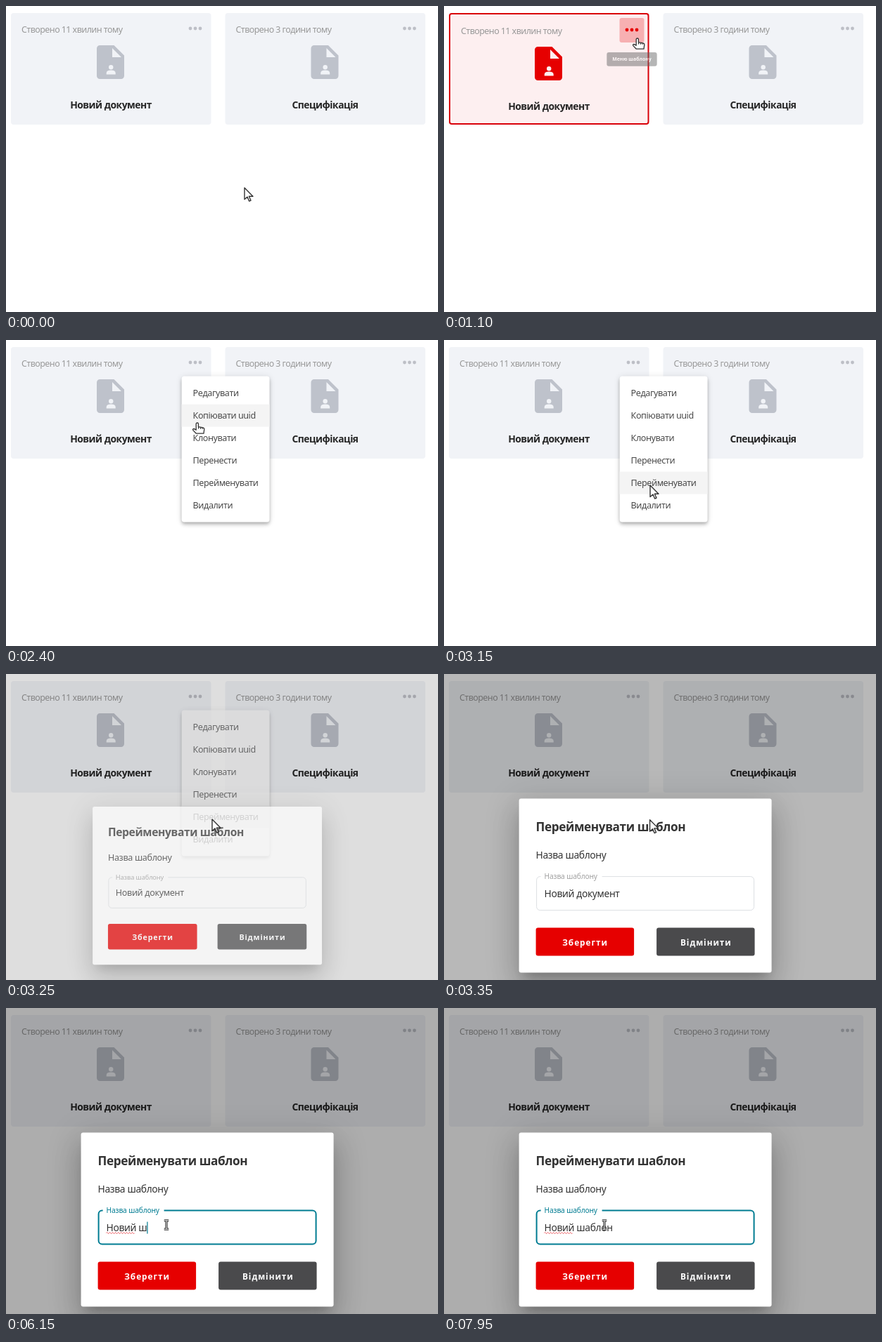
An HTML page for the animation above (8 s loop, 614 px wide and 436 px high).

```html
<!DOCTYPE html>
<html lang="uk">
<head>
<meta charset="utf-8">
<title>Перейменувати шаблон</title>
<style>
html, body { margin: 0; width: 100%; height: 100%; overflow: hidden; background: #fff; }
#stage { position: relative; width: 614px; height: 436px; overflow: hidden; font-family: "Noto Sans", "Open Sans", sans-serif; }
#stage > * { position: absolute; }
svg { display: block; overflow: visible; }
#menu { left: 250px; top: 52px; width: 125px; height: 208px; border-radius: 4px; background: #fff; transform-origin: 0 0;
  box-shadow: 0 2px 4px -1px rgba(0,0,0,.2), 0 4px 5px rgba(0,0,0,.14), 0 1px 10px rgba(0,0,0,.12); }
#shade { inset: 0; background: #000; }
#dialog { left: 107px; top: 178px; width: 359px; height: 248px; border-radius: 3px; background: #fff;
  box-shadow: 0 11px 15px -7px rgba(0,0,0,.2), 0 24px 38px 3px rgba(0,0,0,.14), 0 9px 46px 8px rgba(0,0,0,.12); }
.meta { font-size: 12.4px; letter-spacing: -.53px; fill: #999; }
.name { font-size: 13.9px; font-weight: 700; letter-spacing: -.5px; fill: #262626; text-anchor: middle; }
.item { font-size: 12.6px; letter-spacing: -.44px; fill: #4a4a4a; }
.head { font-size: 17.2px; font-weight: 700; letter-spacing: -.4px; fill: #333; }
.body { font-size: 13.8px; letter-spacing: -.36px; fill: #333; }
.small { font-size: 10.2px; letter-spacing: -.15px; }
.btn { font-size: 11.8px; font-weight: 700; letter-spacing: .95px; fill: #fff; text-anchor: middle; }
.tip { font-size: 7px; font-weight: 700; fill: #fff; text-anchor: middle; }
</style>
</head>
<body>
<div id="stage">
  <svg id="page" width="614" height="436"></svg>
  <div id="menu"><svg id="items" width="125" height="208"></svg></div>
  <div id="shade"></div>
  <div id="dialog">
    <svg width="359" height="248" viewBox="107 178 359 248">
      <text class="head" x="131" y="224">Перейменувати шаблон</text>
      <text class="body" x="131" y="263">Назва шаблону</text>
      <path id="frame" d="M225 289H436a5 5 0 0 1 5 5V332a5 5 0 0 1-5 5H137a5 5 0 0 1-5-5V294a5 5 0 0 1 5-5h1" fill="none"/>
      <text id="label" class="small" x="143" y="292">Назва шаблону</text>
      <rect id="select" y="304" height="19" fill="#7cbfff"/>
      <text id="value" class="body" x="143" y="318"></text>
      <path id="wave" fill="none" stroke="#e8444a" stroke-width=".9"/>
      <rect id="caret" y="305" width="1.2" height="17" fill="#007c92"/>
      <rect x="131" y="362" width="139.5" height="40" rx="3" fill="#e60000"/>
      <rect x="302.5" y="362" width="139.5" height="40" rx="3" fill="#4a4a4c"/>
      <text class="btn" x="201" y="387">Зберегти</text>
      <text class="btn" x="372.8" y="387">Відмінити</text>
    </svg>
  </div>
  <svg id="pointer" width="614" height="436">
    <path id="arrow" d="M0 0V16.6L4 13 6.6 19 9 18 6.4 12.2H12Z" fill="#fff" stroke="#333" stroke-width="1.4" stroke-linejoin="round"/>
    <path id="hand" d="M-1.8 9V1.6a1.6 1.6 0 0 1 3.2 0V5.6l6.6 1.2q2 .5 1.8 2.4l-.8 6H-1.7l-4.4-4.6q-.8-1.4.4-2 1.4-.5 3.9 1.6ZM1.6 5.6v3M4.6 6.3v2.4M7.4 6.8v2" fill="#fff" stroke="#333" stroke-width="1.3" stroke-linejoin="round"/>
    <g id="beam" fill="none">
      <path d="M-3.2-6.2H3.2M0-6.2V6.2M-3.2 6.2H3.2" stroke="#333" stroke-width="3.2"/>
      <path d="M-3.2-6.2H3.2M0-6.2V6.2M-3.2 6.2H3.2" stroke="#eee" stroke-width="1"/>
    </g>
  </svg>
</div>
<script>
const LOOP = 8000;
const $ = id => document.getElementById(id);
const set = (el, attrs) => { for (const k in attrs) el.setAttribute(k, attrs[k]); };
const show = (el, on) => { el.style.display = on ? '' : 'none'; };
const clamp = v => Math.max(0, Math.min(1, v));
const span = (t, a, b) => clamp((t - a) / (b - a));
const pose = s => `translate(-.4px, -.4px) scale(${s})`;

function bezier(x1, y1, x2, y2) {
  const at = (a, b, s) => 3 * a * s * (1 - s) ** 2 + 3 * b * s * s * (1 - s) + s ** 3;
  return x => {
    if (x <= 0 || x >= 1) return clamp(x);
    let lo = 0, hi = 1;
    for (let i = 0; i < 24; i++) {
      const mid = (lo + hi) / 2;
      if (at(x1, x2, mid) < x) lo = mid; else hi = mid;
    }
    return at(y1, y2, lo);
  };
}
const decel = bezier(0, 0, .2, 1);
const fade = bezier(.25, .8, .25, 1);
const glide = bezier(.4, 0, .5, 1);

const card = (id, x, age, name) => `
  <g id="${id}">
    <rect class="bg" x="${x}" y="10" width="284.5" height="159" rx="4" fill="#f1f3f7"/>
    <rect class="spot" x="${x + 242.5}" y="17" width="35" height="35" rx="3" fill="#f7b0b2"/>
    <text class="meta" x="${x + 15}" y="37.5">${age}</text>
    <g class="dots" fill="#bdbfc6">${[255, 262, 269].map(d => `<circle cx="${x + d}" cy="32" r="2.4"/>`).join('')}</g>
    <g class="icon" fill="#bec2cb" transform="translate(${x + 122} 56)">
      <path d="M4.5 0H24.5L39 14.5V43.5a4.5 4.5 0 0 1-4.5 4.5H4.5A4.5 4.5 0 0 1 0 43.5V4.5A4.5 4.5 0 0 1 4.5 0Z"/>
      <path class="cut" d="M22 4V17H35ZM13.7 41.5V39.5q0-4 6.5-4t6.5 4V41.5Z" fill="#f1f3f7"/>
      <circle class="cut" cx="20.2" cy="31.2" r="3.2" fill="#f1f3f7"/>
    </g>
    <text class="name" x="${x + 142}" y="145.5">${name}</text>
  </g>`;

$('page').innerHTML =
  card('first', 7, 'Створено 11 хвилин тому', 'Новий документ') +
  card('second', 311.5, 'Створено 3 години тому', 'Специфікація') +
  `<g id="tip"><rect x="231" y="66" width="72" height="20" rx="3" fill="#616161" fill-opacity=".9"/>
   <text class="tip" x="267" y="78.5">Меню шаблону</text></g>`;
show($('second').querySelector('.spot'), false);

$('items').innerHTML = '<rect id="mark" width="125" height="32" fill="#f4f4f4"/>' +
  ['Редагувати', 'Копіювати uuid', 'Клонувати', 'Перенести', 'Перейменувати', 'Видалити']
    .map((s, i) => `<text class="item" x="16" y="${28.8 + i * 32}">${s}</text>`).join('');

// time, x, y of the pointer's hot spot
const route = [
  [0, 339, 259], [50, 339, 259], [850, 304, 181], [1000, 275, 46], [1800, 275, 46],
  [2400, 272, 118], [2580, 272, 120], [3000, 293, 207], [3300, 293, 207],
  [4200, 231, 303], [4500, 231, 303], [4900, 228, 309]
];
function pointerAt(t) {
  let i = route.length - 1;
  while (i && route[i][0] > t) i--;
  const a = route[i], b = route[i + 1] || a;
  const p = a === b ? 0 : glide(span(t, a[0], b[0]));
  return [a[1] + (b[1] - a[1]) * p, a[2] + (b[2] - a[2]) * p];
}

const typed = [6150, 6320, 6500, 6680, 6850, 7100];
const valueAt = t => {
  const n = typed.filter(k => k <= t).length;
  return 'Новий ' + (n ? 'шаблон'.slice(0, n) : 'документ');
};

function drawCard(t) {
  const on = t >= 900 && t < 1700;
  const q = s => $('first').querySelector(s);
  const bg = on ? '#fdeff0' : '#f1f3f7', ink = on ? '#e60000' : '#bec2cb';
  set(q('.bg'), on
    ? { x: 8, y: 11, width: 282.5, height: 157, rx: 3, fill: bg, stroke: '#d90009', 'stroke-width': 2 }
    : { x: 7, y: 10, width: 284.5, height: 159, rx: 4, fill: bg, stroke: 'none' });
  show(q('.spot'), on && t >= 960);
  set(q('.meta'), { x: on ? 24 : 22, y: on ? 39.5 : 37.5 });
  set(q('.dots'), { fill: on ? ink : '#bdbfc6', transform: on ? 'translate(-2 2)' : '' });
  set(q('.icon'), { fill: ink, transform: `translate(129 ${on ? 58 : 56})` });
  $('first').querySelectorAll('.cut').forEach(c => set(c, { fill: bg }));
  set(q('.name'), { y: on ? 147.5 : 145.5 });

  const p = span(t, 1000, 1200);
  const size = p < .5 ? .99 * decel(p * 2) : .99 + .01 * decel(p * 2 - 1);
  const alpha = p < .5 ? .5 * decel(p * 2) : .5 + .5 * decel(p * 2 - 1);
  set($('tip'), {
    opacity: alpha * (1 - span(t, 1600, 1700)),
    transform: `translate(267 66) scale(${size}) translate(-267 -66)`
  });
}

function drawMenu(t, y) {
  const open = decel(span(t, 1750, 1870));
  show($('menu'), t >= 1750 && t < 3325);
  $('menu').style.opacity = open * (1 - span(t, 3225, 3325));
  $('menu').style.transform = pose(.8 + .2 * open);
  const row = Math.floor((y - 60) / 32);
  show($('mark'), row >= 0 && row < 6);
  set($('mark'), { y: 8 + row * 32 });
}

function drawDialog(t) {
  const p = decel(span(t, 3200, 3350));
  $('shade').style.opacity = .32 * fade(span(t, 3200, 3600));
  show($('dialog'), t >= 3200);
  if (t < 3200) return;
  $('dialog').style.opacity = p;
  $('dialog').style.transform = pose(.7 + .3 * p);

  const focus = t >= 3360;
  set($('frame'), { stroke: focus ? '#007c92' : '#dcdfe3', 'stroke-width': focus ? 2 : 1 });
  set($('label'), { fill: focus ? '#007c92' : '#a0a0a0' });

  const value = $('value');
  const str = valueAt(t);
  if (value.textContent !== str) value.textContent = str;
  const end = 143 + value.getComputedTextLength();

  const word = value.getSubStringLength(0, 5);
  let d = 'M143 321';
  for (let x = 0; x + 4 <= word; x += 4) d += 'q1-2.2 2 0t2 0';
  set($('wave'), { d });
  show($('wave'), focus);

  const from = 143 + value.getSubStringLength(0, 6);
  show($('select'), t >= 4950 && t < typed[0]);
  set($('select'), { x: from, width: Math.max(0, end - from) });
  show($('caret'), t >= typed[0] && t < 7680);
  set($('caret'), { x: end });
}

function drawPointer(t, x, y) {
  const kind = t >= 4500 ? 'beam'
    : (t >= 900 && t < 1700) || (t >= 1750 && t < 3150 && y > 60) ? 'hand' : 'arrow';
  for (const id of ['arrow', 'hand', 'beam']) {
    show($(id), id === kind);
    set($(id), { transform: `translate(${x} ${y})` });
  }
}

function draw() {
  const t = performance.now() % LOOP;
  const [x, y] = pointerAt(t);
  drawCard(t);
  drawMenu(t, y);
  drawDialog(t);
  drawPointer(t, x, y);
  requestAnimationFrame(draw);
}
draw();
</script>
</body>
</html>
```
